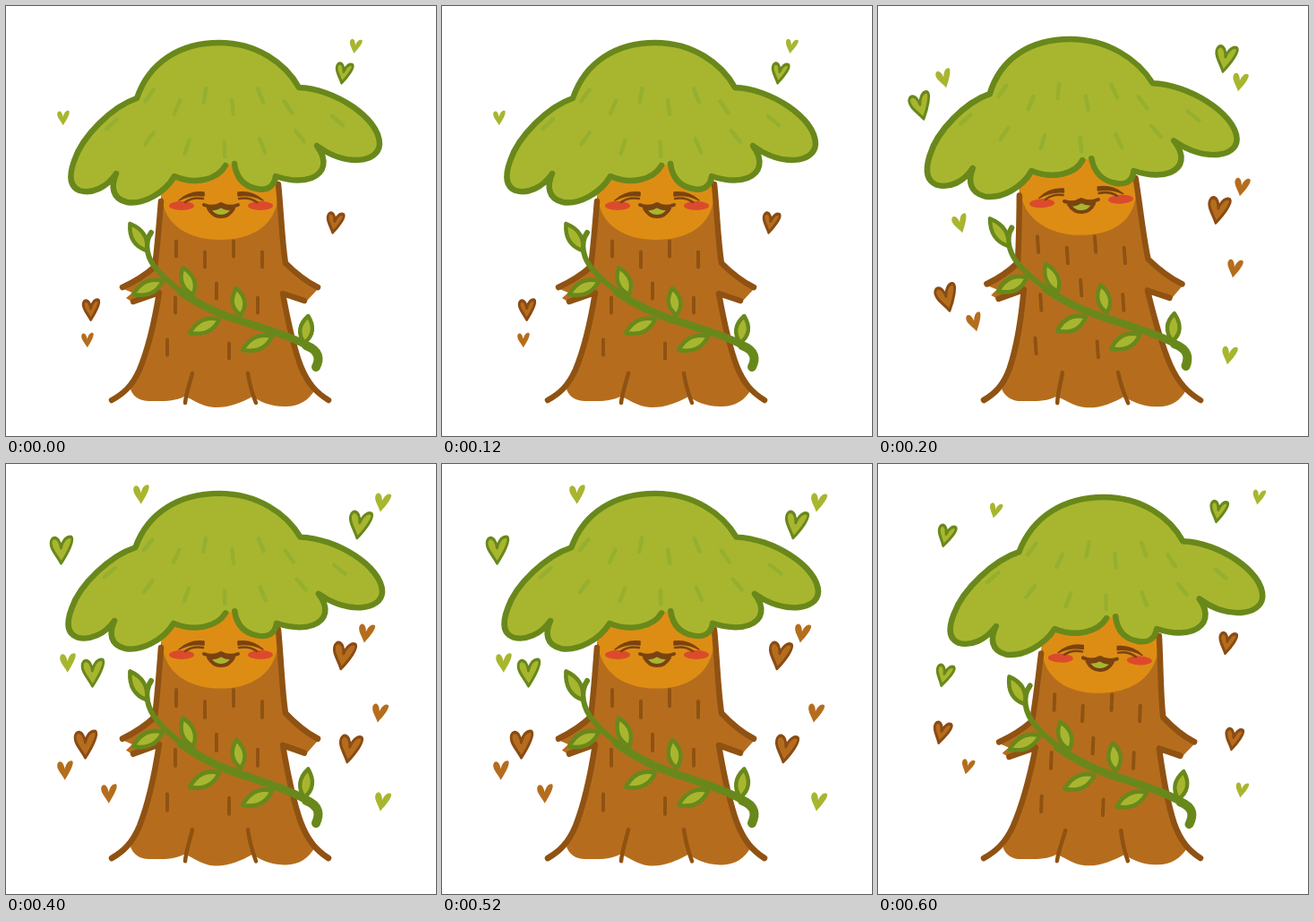
An HTML page for the animation above (0.8 s loop, 480 by 480 pixels).

```html
<!DOCTYPE html>
<html lang="en">
<head>
<meta charset="utf-8">
<title>Happy tree</title>
<style>
  html, body { margin: 0; width: 100%; height: 100%; overflow: hidden; background: #fff; }
  svg { display: block; width: 100vw; height: 100vh; }
  .line { fill: none; stroke-linecap: round; stroke-linejoin: round; }
  .bark { stroke: #8f5212; }
  .stem { stroke: #69881b; }
  .ink { stroke: #7a4310; }
</style>
</head>
<body>
<svg viewBox="0 0 480 480">
  <g id="hearts"></g>

  <g id="body">
    <path fill="#b56d1d" d="M174 205H304C306 245 308 268 313 287L349 315L334 331L309 321C317 360 325 400 345 428
      C338 441 325 448 310 447C294 447 283 441 275 436C262 443 247 449 232 448C217 447 208 438 199 436
      C187 442 172 441 160 441C149 441 142 436 139 428C157 395 164 357 171 321L142 331L134 326L141 320L129 315
      L166 292C169 266 170 240 174 205Z"/>
    <path fill="#de8d14" d="M175 168H303L304 210C302 246 273 261 239 261C206 261 176 246 174 212Z"/>
    <g class="line bark" stroke-width="6.5">
      <path d="M173 218C171 242 169 270 166 291C156 300 143 308 130 314"/>
      <path d="M142 330L171 320C165 357 159 382 149 406C141 424 131 433 118 440"/>
      <path d="M304 199C307 228 308 262 312 287C324 299 336 308 348 314"/>
      <path d="M333 329L309 321C315 354 320 378 329 402C337 422 347 432 360 440"/>
      <path stroke-width="4.5" d="M208 410C205 422 201 432 200 443M270 410C272 423 275 433 279 443"/>
      <path id="grain" stroke-width="4"/>
    </g>
    <g class="line stem">
      <path stroke-width="6" d="M162 253C153 265 158 283 169 295C194 323 236 345 270 354"/>
      <path stroke-width="8.5" d="M195 319C220 337 246 347 270 354C298 363 320 370 338 380"/>
      <path stroke-width="10" d="M335 379C351 385 350 395 346 403"/>
    </g>
    <g id="leaves" class="stem" fill="#a8b62f" stroke-width="4.5" stroke-linejoin="round"></g>
  </g>

  <g id="face">
    <g fill="#dc4a2c">
      <ellipse cx="196" cy="223" rx="14" ry="5"/>
      <ellipse cx="284" cy="223" rx="14" ry="5"/>
    </g>
    <g class="line ink">
      <g id="eye">
        <path fill="#7a4310" stroke-width="1.5" d="M193 217Q205 206 221 208V212Q206 210 193 217Z"/>
        <path stroke-width="2.5" d="M200 219Q208 213 220 215"/>
      </g>
      <use href="#eye" transform="matrix(-1 0 0 1 480 0)"/>
      <path fill="#a8b62f" stroke-width="4" d="M226 226Q234 227 240 223Q246 227 254 226Q249 235 240 235Q231 235 226 226Z"/>
      <path stroke-width="4" d="M221 222Q231 226 240 221Q249 226 259 222"/>
    </g>
  </g>

  <g id="crown" class="line">
    <path class="stem" fill="#a8b62f" stroke-width="6.5" d="M245 178C236 194 211 200 188 190C177 209 153 222 135 219
      C118 215 117 201 123 187C112 203 96 210 82 206C70 201 71 187 76 173C85 145 119 112 146 103
      C160 62 195 41 238 41C280 41 312 64 327 91C366 92 417 125 417 154C416 175 379 180 347 156
      C359 172 356 186 341 192C328 197 313 194 301 190C299 204 289 206 280 204C264 201 257 191 255 176"/>
    <path id="streaks" stroke="#96af2f" stroke-width="4.5"/>
  </g>
</svg>

<script>
const $ = id => document.getElementById(id);
const HOLD = 200, BEATS = 4, ROOT = 440;

const range = n => [...Array(n).keys()];

// Short stroke centred on x, y
function streak(x, y, dx, dy, length) {
  const k = length / 2 / Math.hypot(dx, dy);
  return `M${x - dx * k} ${y - dy * k}l${2 * dx * k} ${2 * dy * k}`;
}

// Vertical bark marks in three rows, alternately raised
const grainRow = (count, x, gap, y, drop) =>
  range(count).map(i => streak(x + gap * i, y + drop * (i % 2), 0, 1, 17)).join('');
$('grain').setAttribute('d',
  grainRow(4, 190, 32, 271, 12) + grainRow(3, 189, 46, 334, -16) + grainRow(2, 180, 69, 381, 4));

// Crown marks fan out from above the middle
const fan = (x, y) => streak(x, y, x - 240, 110, 16);
$('streaks').setAttribute('d',
  range(6).map(i => fan(160 + 31 * i, 100 + 13 * (i % 2))).join('') +
  range(7).map(i => 118 + 42 * i).map(x => fan(x, 160 - (x - 240) ** 2 * .0019)).join(''));

// Leaf bulging on both sides of the line from stem to tip
function leaf(x, y, dx, dy) {
  const k = 9 / Math.hypot(dx, dy);
  const at = (t, side) => `${x + dx * t - dy * k * side} ${y + dy * t + dx * k * side} `;
  return `<path d="M${at(0, 0)}C${at(.3, 1)}${at(.65, 1)}${at(1, 0)}C${at(.65, -1)}${at(.3, -1)}${at(0, 0)}Z"/>`;
}

// Leaves alternate above and below the vine
$('leaves').innerHTML = [[157, 273], [175, 307], [209, 322], [238, 350], [262, 345], [297, 369], [333, 376]]
  .map(([x, y], i) => i % 2 ? leaf(x, y, -33, 15) : leaf(x, y, (x - 300) * .13, -30)).join('');

const HEART = 'M0 1C-.4 .4 -1 0 -1 -.5C-1 -1 -.3 -1.15 -.05 -.15C.1 -.8 .5 -1.1 .85 -1C1.15 -.8 .6 .2 0 1Z';

// Heart drifts: x, y, step x, step y, first beat, beats alive, sideways hop on odd steps
const flocks = [
  { fill: '#a8b62f', edge: '#69881b', size: 31, drifts: [
    [48, 112, 14, -16, 1, 3], [377, 75, 11, -16, 0, 2], [395, 68, -15, -15, 2, 2], [97, 233, -23, 3, 2, 2]] },
  { fill: '#b56d1d', edge: '#8a4b14', size: 31, drifts: [
    [95, 339, -3, -13, 0, 4, -15], [367, 242, 5, -14, 0, 4, 8], [384, 318, 13, -11, 2, 2]] },
  { fill: '#a8b62f', size: 20, drifts: [
    [64, 125, 10, -44, 0, 2], [390, 45, 14, 40, 0, 2], [420, 43, 5, -6, 2, 2],
    [92, 243, -23, -21, 1, 2], [392, 390, 7, -13, 1, 3, 21], [151, 34, -20, 18, 2, 2]] },
  { fill: '#b56d1d', size: 20, drifts: [
    [91, 373, 17, -20, 0, 2], [115, 368, -15, -30, 2, 2], [66, 342, 0, 0, 2, 1],
    [406, 202, -4, -13, 1, 2], [398, 293, 19, -15, 1, 2]] }
];

function flock({ fill, edge, size, drifts }, beat) {
  const line = edge ? 3.5 : 0;
  const height = size * (.95 + .15 * Math.sin((beat - .6) * Math.PI / 2));
  const sy = (height - line) / 2, sx = (height * .84 - line) / 2;
  return drifts.map(([x, y, dx, dy, first, alive, hop = 0]) => {
    const age = beat - first;
    if (age < 0 || age >= alive) return '';
    const tilt = x < 240 ? 2 - 14 * Math.sin(beat * Math.PI / 2) : 12;
    return `<path d="${HEART}" fill="${fill}" stroke="${edge || 'none'}" stroke-width="${line / sy}" stroke-linejoin="round"
      transform="translate(${x + dx * age + hop * (age % 2)} ${y + dy * age}) rotate(${tilt}) scale(${sx} ${sy})"/>`;
  }).join('');
}

const place = (id, value) => $(id).setAttribute('transform', value);
let shown = -1;

function draw(time) {
  const beat = Math.floor(time / HOLD) % BEATS;
  if (beat === shown) return;
  shown = beat;

  // Leans further left than right, and stretches upward halfway through
  const side = Math.sin(beat * Math.PI / 2);
  const swing = .8 * side + .2 * side * side;
  const lift = (1 - Math.cos(beat * Math.PI / 2)) / 2;

  const lean = .068 * swing, rise = .058 * lift;
  place('body', `matrix(1 0 ${lean} ${1 + rise} ${-lean * ROOT} ${-rise * ROOT})`);
  place('face', `translate(${-13 * swing} ${-10 * lift}) rotate(${-3 * swing} 240 223)`);

  const widen = .017 * lift, shear = .05 * swing;
  place('crown', `matrix(${1 + widen} 0 ${shear} ${1 - .027 * lift}
    ${-widen * 240 - 17 * swing - shear * 172} ${-7 * lift})`);
  $('hearts').innerHTML = flocks.map(f => flock(f, beat)).join('');
}

const start = performance.now();
function tick() {
  draw(performance.now() - start);
  requestAnimationFrame(tick);
}
tick();
</script>
</body>
</html>
```
